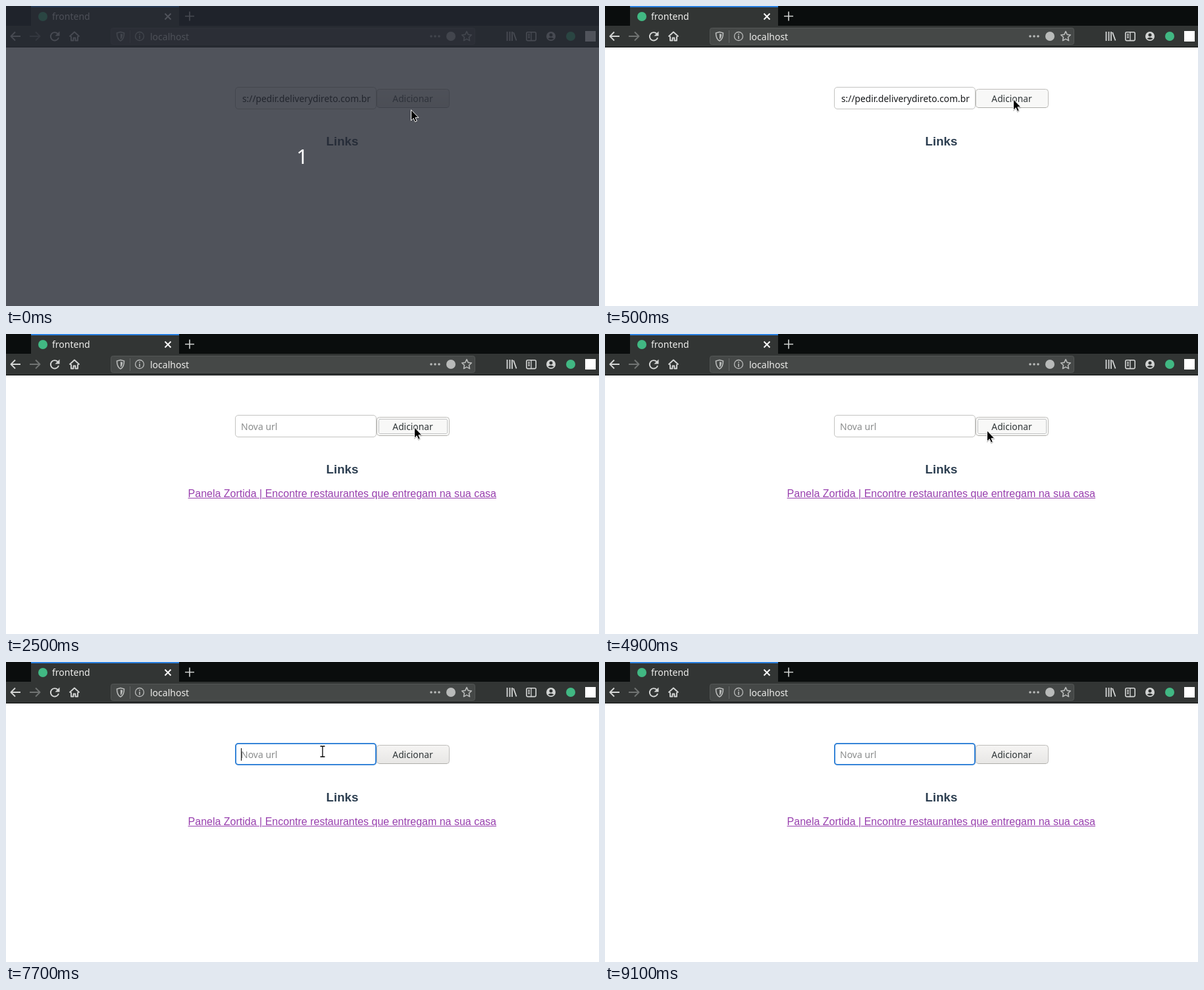
Recreate the animation shown at these times as an HTML page. Size 901x456 px, loop 10 s.

```html
<!DOCTYPE html>
<html lang="pt-BR">
<head>
<meta charset="utf-8">
<title>frontend</title>
<style>
  html, body { margin: 0; width: 100%; height: 100%; overflow: hidden; background: #fff; }
  svg { position: absolute; left: 0; top: 0; }
  text { font: 14px "Noto Sans", sans-serif; }
  .icons { fill: none; stroke: #d3d5d4; stroke-width: 1.6; stroke-linejoin: round; }
  .icons .solid { fill: #d3d5d4; stroke: none; }
  #link {
    position: absolute; right: 156px; top: 234px; margin: 0; white-space: nowrap;
    font: 16px/18px "Liberation Sans", Arial, sans-serif; color: #983fae; text-decoration: underline;
  }
</style>
</head>
<body>
<p id="link">Panela Zortida | Encontre restaurantes que entregam na sua casa</p>
<svg width="901" height="456" viewBox="0 0 901 456">
  <defs>
    <linearGradient id="face" x2="0" y2="1">
      <stop stop-color="#f5f4f3"/><stop offset="1" stop-color="#e8e7e5"/>
    </linearGradient>
    <clipPath id="inputClip"><rect x="357" y="125" width="198" height="30"/></clipPath>
  </defs>

  <!-- Browser bar -->
  <path fill="#0a0d0d" d="M0 0H901V63H0Z"/>
  <path fill="#323534" d="M38 0H263V30H901V62H0V30H38Z"/>
  <path fill="#2a7fde" d="M38 0H263V2H38Z"/>
  <rect x="159.5" y="33.5" width="553" height="25" rx="3" fill="#454847" stroke="#545756"/>
  <path stroke="#666968" d="M188.5 37V56"/>
  <g fill="#eeeeec">
    <text x="70" y="21">frontend</text>
    <text x="219" y="52">localhost</text>
  </g>
  <g class="icons">
    <path stroke="#fff" stroke-width="1.9" d="M241.5 11.500L250.500 20.500M250.500 11.500L241.500 20.500"/>
    <path d="M272 15.500H286M279 8.500V22.500"/>
    <path stroke-width="1.9" d="M22 46H8M14 39.500L7.500 46L14 52.500"/>
    <path stroke="#707372" stroke-width="1.900" d="M36 46H50M45 39.500L51.500 46L45 52.500"/>
    <path stroke-width="1.900" d="M80 48A6.200 6.200 0 1 1 78.500 42"/>
    <path class="solid" d="M81.500 38.500V45.500H74.500Z"/>
    <path stroke-width="1.900" d="M96.500 46.500L104 39.500L111.500 46.500M99 46V52.500H102.500V48.500H105.500V52.500H109V46"/>
    <g stroke="#b9bbba">
      <path d="M174 39.500L179.500 41C179.500 47 178 51 174 53C170 51 168.500 47 168.500 41Z"/>
      <path fill="#b9bbba" stroke="none" d="M174 42L177.300 43C177 47 176 49.500 174 50.500Z"/>
      <circle cx="203" cy="46" r="6.500" stroke-width="1.300"/>
      <path d="M203 45V50M203 42V43.700"/>
      <path stroke-width="3.600" stroke-linecap="round" d="M646 46h0M652 46h0M658 46h0"/>
      <path d="M700 38.700L702.200 43.400L707.300 44L703.500 47.500L704.500 52.600L700 50.100L695.500 52.600L696.500 47.500L692.700 44L697.800 43.400Z"/>
    </g>
    <circle cx="676" cy="46" r="7" fill="#b9bbba" stroke="none"/>
    <path stroke-width="1.800" d="M761.500 39V53M765.500 39V53M769 39V53M771 40L775.500 52.500"/>
    <rect x="790.800" y="39.800" width="14.400" height="12.800" rx="2"/>
    <path stroke-width="1.300" d="M798 40V52M793 43H796M793 45.500H796M793 48H796"/>
    <circle class="solid" cx="828" cy="46" r="7"/>
    <circle cx="828" cy="44" r="2.500" fill="#323534" stroke="none"/>
    <path fill="#323534" stroke="none" d="M823.500 49.500Q828 46 832.500 49.500Q828 53 823.500 49.500Z"/>
  </g>
  <g fill="#41b883">
    <circle cx="56" cy="16" r="7"/>
    <circle cx="858" cy="46" r="7"/>
  </g>
  <path fill="#fff" d="M880 38H896V54H880Z"/>

  <!-- Form -->
  <rect x="348.500" y="123.500" width="214" height="33" rx="4.500" fill="#fff" stroke="#c3c3c1"/>
  <rect id="focus" x="349" y="124" width="213" height="32" rx="4" fill="none" stroke="#3584d8" stroke-width="2"/>
  <text id="url" x="554" y="146" text-anchor="end" clip-path="url(#inputClip)" fill="#16181a" style="font-size:13.8px">s://pedir.deliverydireto.com.br</text>
  <text id="hint" x="357" y="146" fill="#898b8b">Nova url</text>
  <path id="caret" stroke="#000" d="M357.500 131V150"/>
  <rect id="button" x="563.500" y="126.500" width="110" height="28" rx="4" stroke="#bebdba"/>
  <path stroke="#aeada9" d="M567 154.500H670"/>
  <rect id="ring" x="566.500" y="129.500" width="104" height="22" rx="2" fill="none" stroke="#8e9192" stroke-dasharray="1 1"/>
  <text id="label" x="618" y="146" text-anchor="middle" style="font-size:13.8px">Adicionar</text>
  <text x="511" y="212" text-anchor="middle" fill="#2c3e50" style="font:bold 18.72px 'Liberation Sans',Arial,sans-serif">Links</text>

  <!-- Countdown -->
  <g id="countdown">
    <path fill="#252933" fill-opacity=".8" d="M0 0H901V456H0Z"/>
    <text x="450" y="240" text-anchor="middle" fill="#fff" style="font-size:31px;font-weight:300">1</text>
  </g>

  <!-- Pointers -->
  <path id="arrow" fill="#000" stroke="#fff" d="M.5 .8V17.200L4.200 13.700L6.600 19.200L9.300 18L6.900 12.700H12Z" style="filter:drop-shadow(.5px 1px .7px #0005)"/>
  <g id="beam" fill="none">
    <path stroke="#fff" stroke-width="3" d="M0 -8V8"/>
    <path stroke="#000" stroke-width="1.300" d="M-3.500 -8H-1Q0 -8 0 -7Q0 -8 1 -8H3.500M0 -7V7M-3.500 8H-1Q0 8 0 7Q0 8 1 8H3.500"/>
  </g>
</svg>
<script>
const LOOP = 10000;
const el = id => document.getElementById(id);

// [start ms, x, y, shape]
const pointer = [
  [0, 615, 157, 'arrow'], [200, 618, 152, 'arrow'], [300, 620, 147, 'arrow'],
  [500, 620, 141, 'arrow'], [4900, 580, 146, 'arrow'], [5000, 512, 138, 'beam'],
  [5200, 481, 136, 'beam'], [8300, 445, 140, 'beam'], [8400, 396, 112, 'arrow'],
  [8500, 358, 100, 'arrow'], [8700, 341, 94, 'arrow'], [8900, 238, 49, 'arrow'],
  [9000, 135, 8, 'arrow'], [9100, 0, 0, 'none']
];

const show = (id, on) => el(id).setAttribute('visibility', on ? 'visible' : 'hidden');

function render(t) {
  const within = (from, to = LOOP) => t >= from && t < to;

  show('countdown', t < 100);
  show('url', t < 1300);
  show('hint', within(1300));
  show('ring', within(1300, 5300));
  show('focus', within(5300));
  show('caret', within(5300, 6500) || within(7700, 8900));
  el('link').style.visibility = within(2500) ? 'visible' : 'hidden';
  el('button').setAttribute('fill', within(200, 5300) ? '#f8f8f7' : 'url(#face)');
  el('label').setAttribute('fill', t < 200 ? '#505456' : '#2e3436');

  const [, x, y, shape] = pointer.findLast(([start]) => start <= t);
  for (const id of ['arrow', 'beam']) {
    show(id, id === shape);
    el(id).setAttribute('transform', `translate(${x} ${y})`);
  }
}

const begin = performance.now();
function tick() {
  render((performance.now() - begin) % LOOP);
  requestAnimationFrame(tick);
}
tick();
</script>
</body>
</html>
```
